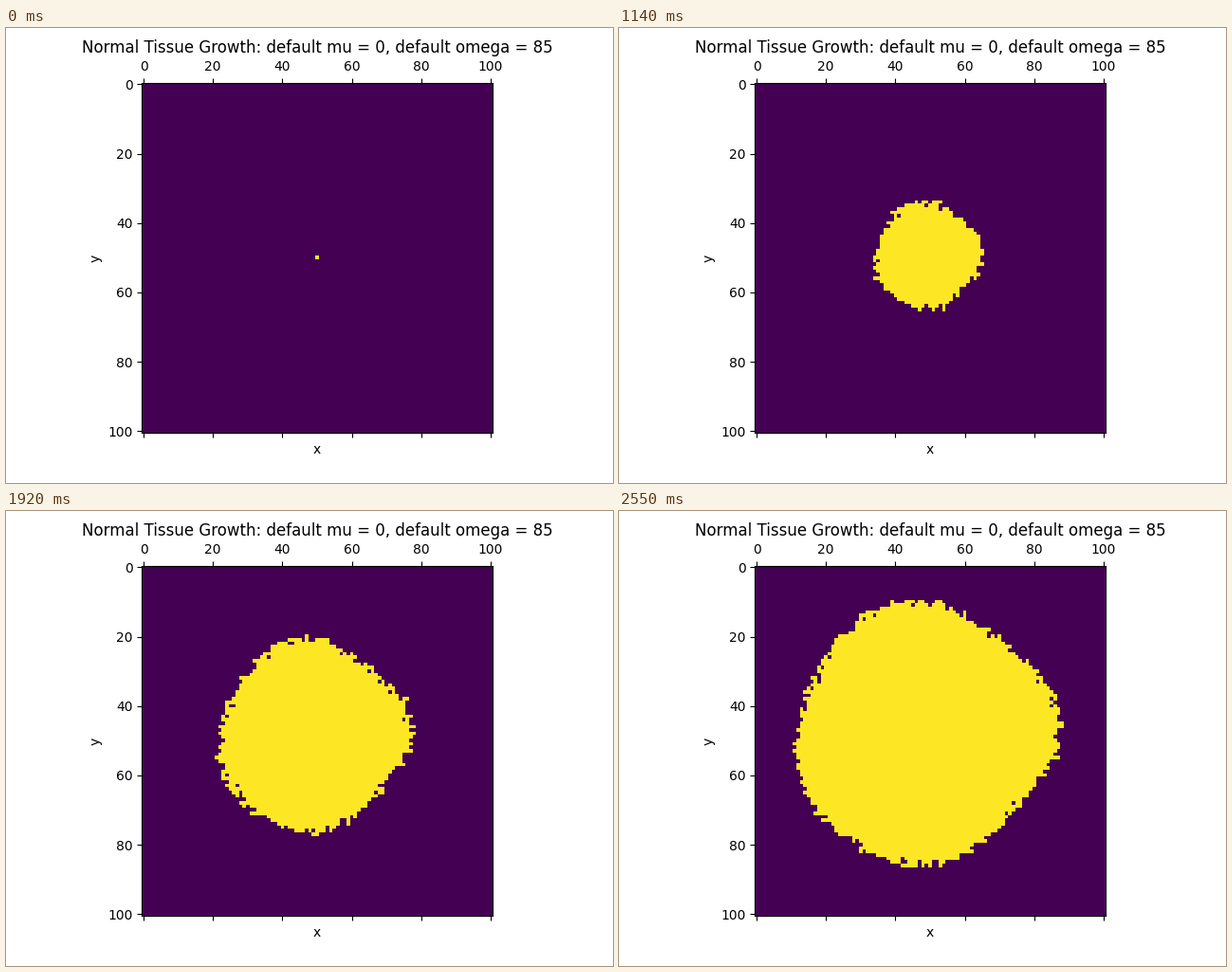
Animation, 640 px wide and 480 px high, one loop 6670 ms. Source, as a matplotlib script:

```python
import numpy as np
import matplotlib.pyplot as plt
from matplotlib.animation import FuncAnimation

SIZE, MID = 101, 50
LAST = 85                # growth steps before the final hold
STEP_MS = 30
INTERVAL, FRAMES = 23, 290
RADIUS, POWER = 36.8, 1.11   # final mean radius in cells, growth exponent


def outline(a):
    """Relative radius of the lopsided colony at angle a (clockwise from right)."""
    return (1 + 0.075 * np.cos(a - 3.87) - 0.019 * np.sin(2 * a)
            + 0.034 * np.cos(3 * a) + 0.036 * np.cos(4 * a + 0.7))


def arrival_times():
    """Step at which each cell is ready to join the colony."""
    rng = np.random.default_rng(7)
    y, x = np.mgrid[:SIZE, :SIZE] - MID
    reach = np.hypot(x, y) / (RADIUS * outline(np.arctan2(y, x)))
    jitter = np.clip(rng.normal(0, 1.8, reach.shape), -4, 4)
    when = np.maximum(LAST * reach ** (1 / POWER) + jitter, 1)
    when[MID - 1, MID], when[MID, MID - 1] = 1, 2
    return when


def spread(cells):
    """Cells together with their four neighbours."""
    out = cells.copy()
    out[1:] |= cells[:-1]
    out[:-1] |= cells[1:]
    out[:, 1:] |= cells[:, :-1]
    out[:, :-1] |= cells[:, 1:]
    return out


def grow():
    """The grid after every step; only cells touching the colony can join."""
    ready = arrival_times()
    cells = np.zeros((SIZE, SIZE), bool)
    cells[MID, MID] = True
    history = [cells]
    for step in range(1, LAST + 1):
        while True:
            bigger = cells | (spread(cells) & (ready <= step))
            if (bigger == cells).all():
                break
            cells = bigger
        history.append(cells)
    return [h.astype(float) for h in history]


history = grow()

fig, ax = plt.subplots(figsize=(6.4, 4.8), dpi=100)
image = ax.matshow(history[0], cmap="viridis", vmin=0, vmax=1)
ax.set_title("Normal Tissue Growth: default mu = 0, default omega = 85")
ax.set_xlabel("x")
ax.set_ylabel("y")


def update(frame):
    step = (frame * INTERVAL + INTERVAL - 1) // STEP_MS
    image.set_data(history[min(step, LAST)])
    return [image]


anim = FuncAnimation(fig, update, frames=FRAMES, interval=INTERVAL,
                     init_func=lambda: update(0), repeat=True, repeat_delay=0)
plt.show()
```
